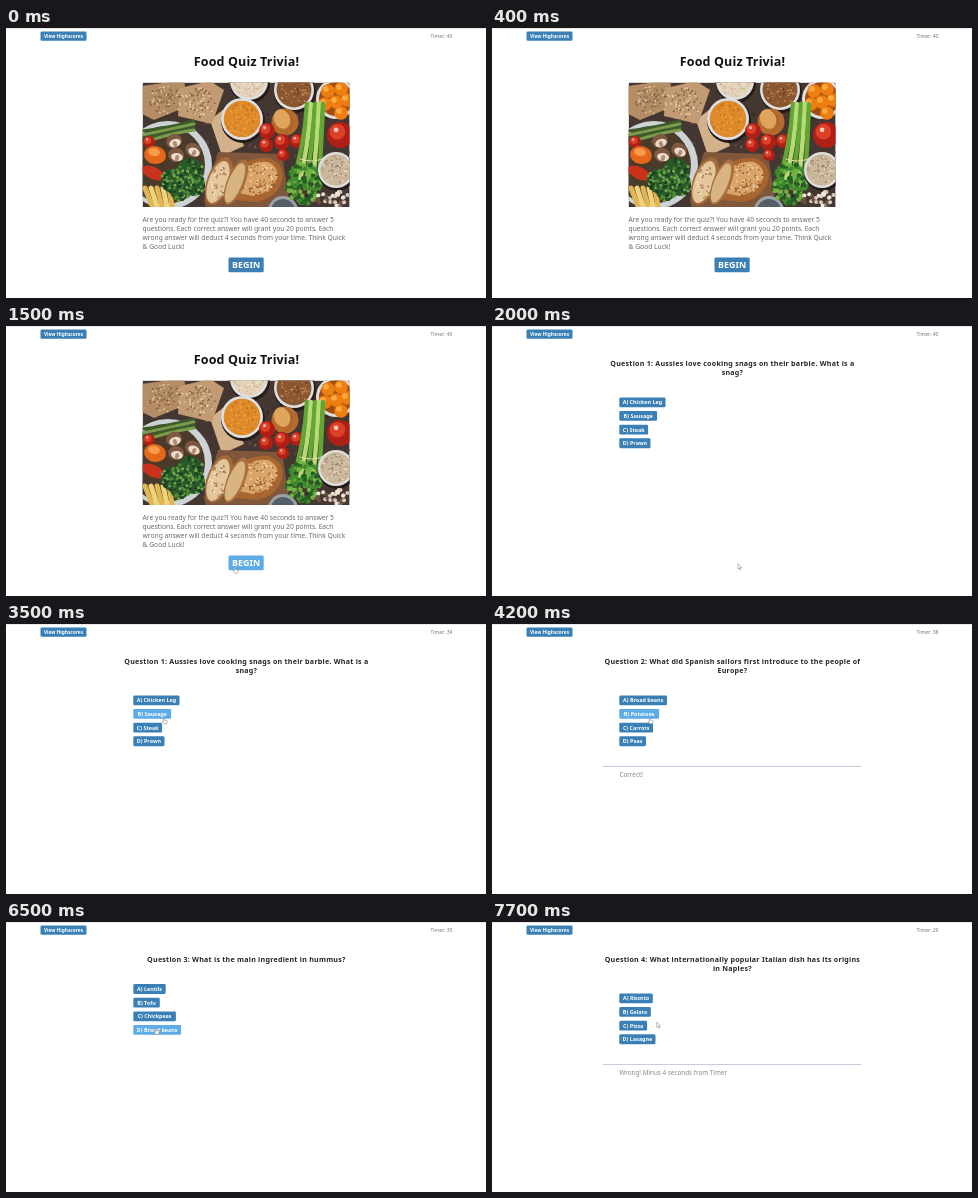
An HTML page for the animation above (8 s loop, 480x270 px).

```html
<!DOCTYPE html>
<html lang="en">
<head>
<meta charset="utf-8">
<title>Food Quiz</title>
<style>
html, body { margin: 0; width: 100%; height: 100%; overflow: hidden; background: #fff; }
svg { display: block; width: 100vw; height: 100vh; font-family: "Noto Sans", "Open Sans", sans-serif; }
.title { font-size: 12.5px; font-weight: 700; letter-spacing: .15px; fill: #111; text-anchor: middle; }
.question { font-size: 7.1px; font-weight: 700; letter-spacing: .24px; fill: #262626; text-anchor: middle; }
.intro { font-size: 6.7px; fill: #6a6a6a; }
.feedback { font-size: 6.33px; fill: #888; }
.timer { font-size: 5px; fill: #777; text-anchor: end; }
.label { fill: #fff; font-weight: 700; text-anchor: middle; }
</style>
</head>
<body>
<svg id="stage" viewBox="0 0 480 270"></svg>
<script>
const NS = "http://www.w3.org/2000/svg";
const stage = document.getElementById("stage");
const LOOP = 8000, STEP = 100;
const BLUE = "#3a80b6", LIGHT_BLUE = "#5dabe7";

function add(parent, tag, attrs = {}, text) {
  const node = document.createElementNS(NS, tag);
  for (const key in attrs) node.setAttribute(key, attrs[key]);
  if (text !== undefined) node.textContent = text;
  parent.appendChild(node);
  return node;
}
const write = (parent, cls, x, y, text) => add(parent, "text", { class: cls, x, y }, text);
const show = (node, on) => node.setAttribute("display", on ? "inline" : "none");

function button(parent, x, y, width, height, text, size) {
  const rect = add(parent, "rect", { x, y, width, height, rx: 1.3, fill: BLUE });
  add(parent, "text", {
    class: "label", x: x + width / 2, y: y + height / 2 + size * 0.36, "font-size": size
  }, text);
  return { rect, hit: (px, py) => px >= x && px <= x + width && py >= y && py <= y + height };
}

// Header
add(stage, "rect", { width: 480, height: 270, fill: "#fff" });
add(stage, "rect", { width: 480, height: 1, fill: "#e9e9e9" });
button(stage, 34.5, 3.6, 46, 9.2, "View Highscores", 4.8);
const timer = write(stage, "timer", 446.4, 10, "");

// Food picture built from flat shapes
function drawFood(parent) {
  const clip = add(add(parent, "defs"), "clipPath", { id: "frame" });
  const area = { x: 136.6, y: 54.6, width: 207, height: 124.4 };
  add(clip, "rect", area);
  const g = add(parent, "g", { "clip-path": "url(#frame)" });
  let seed = 7;
  const random = () => (seed = (seed * 16807) % 2147483647) / 2147483647;
  const oval = (cx, cy, rx, ry, fill, turn = 0) =>
    add(g, "ellipse", { cx, cy, rx, ry, fill, transform: `rotate(${turn} ${cx} ${cy})` });
  const disc = (cx, cy, r, fill) => oval(cx, cy, r, r, fill);
  const shape = (d, fill) => add(g, "path", { d, fill });
  const stroke = (d, color, width) =>
    add(g, "path", { d, fill: "none", stroke: color, "stroke-width": width, "stroke-linecap": "round" });
  function flecks(cx, cy, rx, ry, count, colors, size) {
    for (let i = 0; i < count; i++) {
      const angle = random() * 2 * Math.PI, r = Math.sqrt(random());
      disc(cx + rx * r * Math.cos(angle), cy + ry * r * Math.sin(angle), size, colors[i % colors.length]);
    }
  }
  function bowl(cx, cy, r, fill, colors) {
    disc(cx + 1, cy + 2, r + 1, "#241c1a");
    disc(cx, cy, r, "#dedfdf");
    disc(cx, cy, r * 0.87, fill);
    flecks(cx, cy, r * 0.8, r * 0.8, 80, colors, 0.8);
  }
  function tomato(x, y, r) {
    disc(x, y, r, "#b01f15");
    disc(x - r * 0.2, y - r * 0.25, r * 0.6, "#dc4029");
    disc(x - r * 0.3, y - r * 0.4, r * 0.18, "#f6c9b8");
  }
  function mushroom(x, y, turn) {
    oval(x, y, 8, 7, "#80573f", turn);
    oval(x + 1, y + 2, 6, 4, "#ecdccb", turn);
    oval(x + 1, y + 3, 2, 3, "#b08c72", turn);
  }

  add(g, "rect", { ...area, fill: "#443631" });
  flecks(240, 116, 110, 66, 120, ["#2d2422", "#5c4a40", "#76604f"], 1.2);

  // Crispbreads on a pale board
  shape("M204 92L222 78L238 118L216 128Z", "#d3b28b");
  shape("M136 58L178 52L182 78L148 92L136 86Z", "#b48d67");
  shape("M174 60L204 53L218 62L206 96L172 88Z", "#c29b74");
  flecks(160, 72, 18, 14, 90, ["#7d5a3c", "#e2c7a2", "#a17a54"], 0.9);
  flecks(194, 75, 16, 15, 90, ["#83603f", "#ead1ae", "#a57e57"], 0.9);

  // Bowls
  bowl(243, 53, 19, "#e3d2b9", ["#c6ac88", "#f3e8d6"]);
  bowl(288, 62, 20, "#8a5730", ["#b67a46", "#633a1e", "#d19b63"]);
  bowl(236, 91, 21, "#df8a2a", ["#f0a748", "#c06f18"]);
  disc(330, 71, 20, "#dedfdf");
  disc(330, 71, 17, "#a04e10");
  [[322, 63], [335, 61], [319, 76], [330, 74], [341, 72], [335, 85]].forEach(([x, y]) => {
    disc(x, y, 6.8, "#ee7d12");
    disc(x - 2, y - 2, 2.8, "#ffaa3f");
  });

  // Vegetable plate with asparagus
  disc(162, 137, 44, "#cdd3d5");
  disc(160, 137, 39, "#4a3a2a");
  for (let i = 0; i < 4; i++)
    stroke(`M136 ${103 + i * 4}Q162 ${100 + i * 2} 188 ${93 + i * 3}`, i % 2 ? "#7c9b4b" : "#3d5c2b", 3);
  tomato(143, 114, 6);
  oval(149, 127, 11, 9, "#e5671a", 10);
  oval(148, 124, 6, 4, "#f99b4a", 10);
  mushroom(168, 113, -20);
  mushroom(187, 122, 25);
  mushroom(170, 127, 10);
  oval(147, 145, 12, 6, "#cb321b", 25);
  for (let i = 0; i < 5; i++)
    stroke(`M${139 + i * 6} 160L${146 + i * 5} 178`, i % 2 ? "#f1d27c" : "#dfb653", 5);
  [[184, 143, 13], [167, 153, 12], [188, 157, 11], [174, 163, 10]].forEach(([x, y, r]) => {
    disc(x, y, r, "#28572a");
    flecks(x, y, r, r, 36, ["#4f8b36", "#183f1f", "#71a54d"], 1.5);
  });

  // Bread
  shape("M198 172L212 124L276 126L284 179L200 180Z", "#80573a");
  shape("M231 140Q246 128 263 130Q280 137 276 153Q270 171 250 174L222 171Z", "#a9652f");
  shape("M234 143Q248 132 262 134Q274 140 271 151Q264 165 247 168L228 164Z", "#d9a56b");
  flecks(252, 151, 20, 16, 100, ["#f0d9ae", "#b6793d", "#8d5428"], 0.9);
  oval(213, 153, 12, 25, "#a56a3a", 20);
  oval(212, 154, 9.5, 22, "#e4c69d", 20);
  oval(230, 154, 9, 24, "#a9703f", 22);
  oval(229, 155, 7, 21, "#d9b483", 22);
  flecks(213, 154, 8, 18, 45, ["#b98d5d", "#f4e2c5", "#987047"], 0.9);
  disc(277, 183, 15, "#9aa2aa");
  disc(277, 183, 12, "#555d66");

  // Onion, tomatoes and celery
  disc(279, 94, 13.5, "#b56b2d");
  oval(276, 91, 8, 10, "#e0a55c", -20);
  stroke("M279 82C289 89 288 99 280 105", "#96572a", 0.7);
  [[261, 103, 8], [276, 114, 8], [291, 113, 7], [260, 117, 7], [277, 127, 6], [334, 107, 13]]
    .forEach(t => tomato(...t));
  for (let i = 0; i < 5; i++)
    stroke(`M${301 + i * 4} 76Q${299 + i * 4} 116 ${285 + i * 7} 160`, i % 2 ? "#b5db73" : "#64a635", 4.5);
  flecks(298, 156, 18, 21, 130, ["#245f25", "#3f8a2e", "#73b443"], 2.2);
  stroke("M294 131Q306 135 316 131", "#e3dcab", 1);
  bowl(330, 142, 18, "#cbb79c", ["#eee2cb", "#8f7860", "#b79e80"]);
  flecks(327, 171, 17, 8, 28, ["#d9cabb", "#6b4f40", "#f0e7db"], 2);
}

// Start screen
const start = add(stage, "g");
write(start, "title", 240.5, 38.4, "Food Quiz Trivia!");
drawFood(start);
[
  "Are you ready for the quiz?! You have 40 seconds to answer 5",
  "questions. Each correct answer will grant you 20 points. Each",
  "wrong answer will deduct 4 seconds from your time. Think Quick",
  "& Good Luck!"
].forEach((line, i) => write(start, "intro", 136.6, 193.6 + i * 9.05, line));
const begin = button(start, 222.5, 229.6, 35.2, 14.6, "BEGIN", 8.9);

// Question screens
function questionScreen(from, clearAt, lines, options, feedback) {
  const group = add(stage, "g");
  const shift = (lines.length - 2) * 9.3;
  lines.forEach((line, i) => write(group, "question", 240.4, 39.5 + i * 9.3, line));
  const buttons = options.map(([text, width], i) =>
    button(group, 127.3, 71.4 + shift + i * 13.65, width, 9.8, text, 5.4));
  const note = add(group, "g");
  if (feedback) {
    add(note, "rect", { x: 111, y: 142 + shift, width: 258.5, height: 0.8, fill: "#b9c1d6" });
    write(note, "feedback", 127.4, 152.5 + shift, feedback);
  }
  return { from, clearAt, group, buttons, note };
}
const screens = [
  { from: 0, clearAt: 0, group: start, buttons: [begin] },
  questionScreen(1900, 1900,
    ["Question 1: Aussies love cooking snags on their barbie. What is a", "snag?"],
    [["A) Chicken Leg", 46.2], ["B) Sausage", 37.8], ["C) Steak", 28.8], ["D) Prawn", 31.2]]),
  questionScreen(3900, 4800,
    ["Question 2: What did Spanish sailors first introduce to the people of", "Europe?"],
    [["A) Broad beans", 47.7], ["B) Potatoes", 39.8], ["C) Carrots", 33.7], ["D) Peas", 26.7]],
    "Correct!"),
  questionScreen(5500, 6400,
    ["Question 3: What is the main ingredient in hummus?"],
    [["A) Lentils", 32.4], ["B) Tofu", 26.5], ["C) Chickpeas", 42.6], ["D) Broad beans", 47.7]],
    "Correct!"),
  questionScreen(7300, LOOP,
    ["Question 4: What internationally popular Italian dish has its origins", "in Naples?"],
    [["A) Risotto", 33.5], ["B) Gelato", 31.5], ["C) Pizza", 27.8], ["D) Lasagne", 36.2]],
    "Wrong! Minus 4 seconds from Timer")
];

// Pointer
const cursor = add(stage, "g", { fill: "#fff", stroke: "#777", "stroke-width": 0.5, "stroke-linejoin": "round" });
const arrow = add(cursor, "path", { d: "M0 0V5.2L1.2 4.1L2 6L2.9 5.6L2.1 3.8H3.7Z" });
const hand = add(cursor, "path", {
  d: "M-.5 .3Q0 -.4 .5 .3V2.3L3 2.8Q3.5 3 3.4 3.8L2.9 6H.1L-1.6 3.8Q-1.5 3 -.5 3.7Z"
});
const path = [
  [1000, 158.7, 255], [1700, 246, 237.8], [2000, 246, 237.8], [3400, 157.8, 93.8],
  [5600, 157.8, 93.8], [6700, 149, 107.5], [7300, 149, 107.5], [7700, 164.8, 100.2]
];
function pointerAt(t) {
  const next = path.findIndex(p => p[0] > t);
  if (next < 0) return path[path.length - 1].slice(1);
  if (next === 0) return path[0].slice(1);
  const [t0, x0, y0] = path[next - 1], [t1, x1, y1] = path[next];
  const p = (t - t0) / (t1 - t0), eased = p * p * (3 - 2 * p);
  return [x0 + (x1 - x0) * eased, y0 + (y1 - y0) * eased];
}

const ticks = [2800, 3600, 4400, 5200, 6000, 6800, 7500];
const PENALTY_AT = 7300;

function render(time) {
  const t = Math.floor((time % LOOP) / STEP) * STEP;
  const current = screens.filter(s => s.from <= t).pop();
  const [x, y] = pointerAt(t);
  const visible = t >= path[0][0];
  let hovering = false;

  screens.forEach(s => show(s.group, s === current));
  if (current.note) show(current.note, t < current.clearAt);
  current.buttons.forEach(b => {
    const over = visible && b.hit(x, y);
    b.rect.setAttribute("fill", over ? LIGHT_BLUE : BLUE);
    hovering = hovering || over;
  });

  const left = 40 - ticks.filter(tick => tick <= t).length - (t >= PENALTY_AT ? 4 : 0);
  timer.textContent = "Timer: " + left;
  show(cursor, visible);
  show(arrow, !hovering);
  show(hand, hovering);
  cursor.setAttribute("transform", `translate(${x} ${y})`);
}

const origin = performance.now();
function loop(now) {
  render(Math.max(0, now - origin));
  requestAnimationFrame(loop);
}
render(0);
requestAnimationFrame(loop);
</script>
</body>
</html>
```
